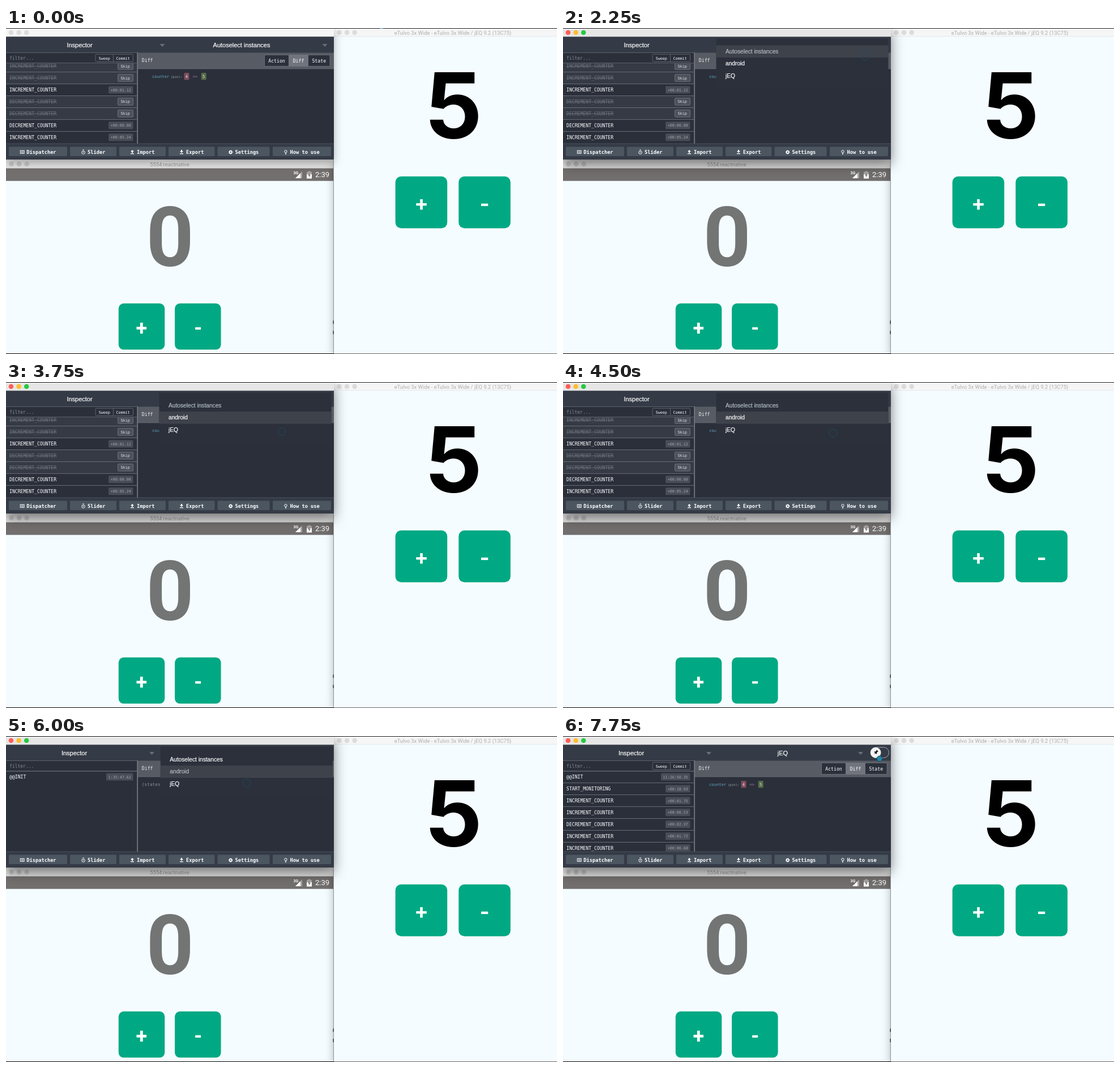
These frames come from a looping animation (973x575 px, 8 s). An HTML page:

```html
<!DOCTYPE html>
<html lang="en">
<head>
<meta charset="utf-8">
<title>Remote inspector</title>
<style>
html, body { margin: 0; width: 100%; height: 100%; overflow: hidden; background: #000; }
svg { display: block; width: 973px; height: 575px; }
text { white-space: pre; }
.firm { stroke: currentColor; stroke-width: .2px; }
#shade, #phone { filter: drop-shadow(0 5px 8px rgba(0,0,0,.3)); }
#shade.on { filter: drop-shadow(0 8px 11px rgba(0,0,0,.5)); }
</style>
</head>
<body>
<svg id="stage" viewBox="0 0 973 575" xmlns="http://www.w3.org/2000/svg"></svg>
<script>
const SANS = 'Liberation Sans, Arial, sans-serif';
const UI = 'Roboto, sans-serif';
const MONO = 'DejaVu Sans Mono, monospace';
const DEVICE = 'eTulvo 3x Wide', SYSTEM = 'jEQ';
const LOOP = 8000, STEP = 250;
const pen = document.createElement('canvas').getContext('2d');

const rect = (x, y, w, h, fill, extra = '') =>
  `<rect x="${x}" y="${y}" width="${w}" height="${h}" fill="${fill}" ${extra}/>`;
const text = (s, x, y, size, fill, font = MONO, extra = '') =>
  `<text x="${x}" y="${y}" font-size="${size}" fill="${fill}" font-family="${font}" ${extra}>${s}</text>`;
const mid = (s, x, y, size, fill, font = MONO, extra = '') =>
  text(s, x, y, size, fill, font, 'text-anchor="middle" ' + extra);
const path = (d, fill, extra = '') => `<path d="${d}" fill="${fill}" ${extra}/>`;
const disc = (x, y, r, fill, extra = '') => `<circle cx="${x}" cy="${y}" r="${r}" fill="${fill}" ${extra}/>`;
const group = (id, body, extra = '') => `<g id="${id}" ${extra}>${body}</g>`;
const lights = (x, y, fills) => fills.map((f, i) => disc(x + i * 13.6, y, 4.3, f)).join('');

// Centres the visible ink of a glyph on a point.
function glyph(s, x, y, size, weight, font, fill) {
  pen.font = `${weight} ${size}px ${font}`;
  const m = pen.measureText(s);
  const left = x - (m.actualBoundingBoxRight - m.actualBoundingBoxLeft) / 2;
  const base = y + (m.actualBoundingBoxAscent - m.actualBoundingBoxDescent) / 2;
  return text(s, left, base, size, fill, font, `font-weight="${weight}"`);
}

function key(s, x, y, side, size, weight, font, dy) {
  return rect(x, y, side, side, '#00a983', `rx="${side / 9}"`) +
    glyph(s, x + side / 2, y + side / 2 + dy, size, weight, font, '#fff');
}

function phone() {
  const font = 'Inter, sans-serif';
  return rect(579, 0, 394, 574.4, '#f5fcff', 'id="phone"') +
    rect(579, 0, 394, 15, '#f6f6f6') + rect(579, 14.5, 394, 0.7, '#dfe2e3') +
    lights(588.5, 8, ['#dcdcdc', '#dcdcdc', '#dcdcdc']) +
    mid(`${DEVICE} - ${DEVICE} / ${SYSTEM} 9.2 (13C75)`, 789, 11.5, 9.4, '#adadad', UI) +
    glyph('5', 791.5, 136.5, 160, 700, font, '#000') +
    key('+', 687.6, 261.7, 91.6, 37, 700, font, 3.5) + key('-', 799.3, 261.7, 91.6, 37, 700, font, 3.5);
}

function emulator() {
  return rect(0, 225, 579, 23, '#e2e2e2') + rect(0, 247.5, 579, 22, '#736f6f') +
    lights(9.5, 240, ['#c6c6c6', '#c6c6c6', '#c6c6c6']) +
    mid('5554:reactnative', 289, 243.7, 9.4, '#999', UI) +
    text('3G', 507.5, 258, 7, '#fff', UI, 'font-weight="700"') +
    path('M511 265L523 253V265Z', '#a9a6a6') + path('M511 265L520 256V265Z', '#fff') +
    path('M531 254h2.5v-1.5h4v1.5h2.5v4h-9z', '#a9a6a6') + path('M531 258h9v7.5h-9z', '#fff') +
    path('M536.5 255l-3.5 5h2.3l-.8 4 3.5-5h-2.2z', '#736f6f') +
    text('2:39', 546, 263.2, 13, '#fff', UI) +
    rect(0, 269.5, 579, 304.5, '#f5fcff') +
    glyph('0', 289.5, 367.7, 147, 700, UI, '#737575') +
    key('+', 198.8, 485.8, 81.5, 36, 700, UI, 2) + key('-', 298.1, 485.8, 81.5, 36, 700, UI, 2.5);
}

function seam() {
  return rect(578, 233, 1, 341, '#8d9294') + rect(577.5, 516, 1.5, 6, '#333') + rect(577.5, 534, 1.5, 6, '#333');
}

function chip(s, c) {
  const w = s.length * 4 + 7.5;
  return rect(224.5 - w, c - 6.5, w, 13, '#484d57', 'rx="1.5"') +
    mid(s, 224.5 - w / 2, c + 2.6, 6.7, '#a2a6ad');
}

// A row without a time stamp is skipped.
function row([name, time], c) {
  const skipped = !time;
  const tag = skipped
    ? rect(197.5, c - 6.3, 27, 12.6, '#4c515b', 'stroke="#757a83" stroke-width=".8" rx="1.5"') +
      mid('Skip', 210.7, c + 2.6, 6.8, '#e4e4e4')
    : chip(time, c);
  return (skipped ? rect(0, c - 10.2, 231, 20.6, '#353a44') : '') +
    text(name, 6, c + 3, 8.13, skipped ? '#6f747d' : '#fff', MONO,
      skipped ? 'text-decoration="line-through"' : '') + tag;
}

const INC = 'INCREMENT_COUNTER', DEC = 'DECREMENT_COUNTER';
const lists = {
  auto: [67, [[INC], [INC], [INC, '+00:01.12'], [DEC], [DEC], [DEC, '+00:00.00'], [INC, '+00:05.24']]],
  android: [72, [['@@INIT', '1:35:47.62']]],
  other: [72, [['@@INIT', '11:26:50.35'], ['START_MONITORING', '+00:18.93'], [INC, '+00:01.75'],
    [INC, '+00:00.53'], [DEC, '+00:02.37'], [INC, '+00:01.72'], [INC, '+00:00.68']]]
};
const labels = { auto: 'Autoselect instances', android: 'android', other: SYSTEM };
const modes = Object.keys(lists);

function list(mode) {
  const [top, rows] = lists[mode];
  const lines = rows.map((r, i) => {
    const c = top + i * 20.95;
    return row(r, c) + (i ? rect(0, c - 10.8, 231, 1, '#696d75') : '');
  });
  return group('list-' + mode, lines.join(''), 'clip-path="url(#pane)"');
}

function tabs() {
  const tab = (s, x, w, fill) =>
    rect(x, 47.5, w, 20, fill, 'stroke="#747881" stroke-width=".8"') + mid(s, x + w / 2, 60.5, 8.2, '#fff');
  return tab('Action', 456.5, 43, '#2b303b') + tab('Diff', 499.5, 34, '#70747d') + tab('State', 533.5, 38.5, '#2b303b');
}

function diff() {
  return text('counter', 258, 88, 7.2, '#63a4bb') + text('(pin):', 291, 88, 5.6, '#a0a4ab') +
    rect(314.5, 79, 9, 12.5, '#7d4d5c', 'rx="1.5"') + mid('4', 319, 88, 7.2, '#f3dfe4') +
    text('=&gt;', 329.5, 88, 7.2, '#a274ac') +
    rect(344.7, 79, 9, 12.5, '#566a49', 'rx="1.5"') + mid('5', 349.2, 88, 7.2, '#dcecc9');
}

function toolbar() {
  const line = 'stroke="#fff" stroke-width="1"';
  const tray = x => rect(x, 221, 6, 1.3, '#fff');
  const up = x => path(`M${x + 3} 215l3 3.2h-2v2h-2v-2h-2z`, '#fff') + tray(x);
  const down = x => path(`M${x + 3} 220.3l3-3.2h-2v-2h-2v2h-2z`, '#fff') + tray(x);
  const icons = [
    rect(25.3, 216.2, 6.8, 5, 'none', line) + rect(27, 217.6, 3.6, 0.8, '#fff') + rect(27, 219.4, 3.6, 0.8, '#fff'),
    disc(136.5, 219.5, 2.8, 'none', line) + path('M135.3 214.8h2.4M136.5 218v2', 'none', line),
    up(220), down(307),
    disc(396.7, 219, 2.1, 'none', 'stroke="#fff" stroke-width="1.8"') +
      disc(396.7, 219, 3.2, 'none', 'stroke="#fff" stroke-width="1" stroke-dasharray="1.2 1.31"'),
    disc(494, 217.8, 2.2, 'none', line) + path('M492.8 221.3h2.4M493.2 222.7h1.6', 'none', line)
  ];
  const items = [['Dispatcher', 5, 103, 36.3], ['Slider', 113, 82, 144], ['Import', 200, 82, 231],
    ['Export', 287, 81.5, 318], ['Settings', 373.5, 92, 404.5], ['How to use', 471, 103, 501.5]];
  return rect(0, 204, 579, 28, '#353b46') + rect(0, 203.5, 579, 1, '#4d525c') +
    items.map(([s, x, w, at], i) => rect(x, 209.5, w, 16.5, '#4b5661', 'rx="1.5"') +
      text(s, at, 221.7, 8.7, '#fff', MONO, 'font-weight="700"') + icons[i]).join('');
}

function header(id, label, left, leftTip, right, rightTip) {
  const tip = x => path(`M${x - 4.5} 28.2h9l-4.5 4.8z`, '#6d737d');
  const title = (s, x) => mid(s, x, 34, 11, '#fff', SANS, 'class="firm" color="#fff"');
  return group(id, title('Inspector', left) + tip(leftTip) + title(label, right) + tip(rightTip));
}

function toggle() {
  return rect(543, 20, 32.5, 18.5, '#353b46', 'rx="9.2" stroke="#a4a8ae" stroke-width="1"') +
    disc(552.3, 29.2, 9.2, '#f5f5f5') +
    path('M-1.9-4.2h3.8v1l-.7.5.4 2.2 1.4 1.2v.8H.5L0 4.8-.5 1.5H-3V.7l1.4-1.2.4-2.2-.7-.5z', '#111',
      'transform="translate(552.5 29) rotate(42)"');
}

function menu() {
  return group('menu', rect(0, 18.5, 304, 88, '#2b303b') +
    rect(0, 30.5, 304, 21.7, '#3e424b', 'id="hover"') +
    modes.map((m, i) =>
      text(labels[m], 16.5, 44.7 + i * 21.6, 10.2, '#fff', SANS, `id="item-${m}" class="firm"`)).join(''));
}

function inspector() {
  return rect(0, 0, 579, 232, '#2a2f3a', 'id="shade"') +
    rect(0, 0, 579, 15.5, '#f6f6f6') +
    group('idle', lights(9, 8, ['#dcdcdc', '#dcdcdc', '#dcdcdc'])) +
    group('focus', rect(0, 0, 579, 15.5, '#e6e6e6') + lights(9, 8, ['#ff5f57', '#ffbd2e', '#28c940'])) +
    rect(0, 15.5, 579, 28, '#353b46') +
    modes.map(m => m === 'auto' ? header('head-auto', labels.auto, 130, 276, 416, 563)
      : header('head-' + m, labels[m], 120.5, 257.5, 388, 525.5)).join('') +
    group('toggle', toggle()) +
    rect(0, 43, 231, 1, '#5c6069') + text('filter...', 6, 56, 8, '#858b94') +
    group('sweep', rect(158, 46.3, 66.5, 13, '#2a2f3a', 'rx="1.5" stroke="#5e636d" stroke-width="1"') +
      rect(189, 46.3, 1, 13, '#5e636d') + mid('Sweep', 173.7, 55.5, 6.7, '#fff') + mid('Commit', 206.5, 55.5, 6.7, '#fff')) +
    rect(0, 61.5, 231, 1, '#7d8189') + modes.map(list).join('') +
    rect(231.3, 43, 1.7, 161, '#777a81') +
    rect(233, 43.5, 346, 28.5, '#575b64') + rect(233, 71.5, 346, 0.8, '#696d75') +
    text('Diff', 239.8, 60.2, 8.2, '#f0f0f0') + tabs() +
    group('diff', diff()) + group('equal', text('(states are equal)', 239.8, 87.5, 7.8, '#8b9099')) +
    toolbar() + menu();
}

const stage = document.getElementById('stage');
stage.innerHTML = '<defs><clipPath id="pane"><rect x="0" y="62.3" width="231" height="141.2"/></clipPath></defs>' +
  rect(0, 0, 973, 575, '#000') + emulator() + phone() + seam() + inspector() +
  rect(0, 0, 973, 1, '#1c1c1c') + '<circle id="ring" stroke-width="1"/>';

const el = id => document.getElementById(id);
const show = (id, on) => el(id).style.display = on ? '' : 'none';

// Pointer path: time, x, y
const track = [[0, 663, -6], [500, 551, 33], [1000, 551, 33], [1250, 546, 48], [2250, 533, 50], [2750, 517, 66],
  [3500, 490, 87], [4500, 477, 90], [4750, 468, 76], [5250, 450, 52], [5500, 447, 55], [6000, 425, 83],
  [6500, 416, 104], [6750, 413, 98], [7500, 559, 46], [7750, 559, 40]];
// Menu states: time, open amount, hovered item
const menuSteps = [[0, 0, 0], [1750, 1, 0], [3250, 1, 1], [4750, 0, 1], [5500, 1, 1], [6250, 1, 2], [6750, 0.12, 2], [7000, 0, 2]];
const clicks = [1500, 5250, 7750];

function pointer(t) {
  const i = track.findIndex(k => k[0] >= t);
  if (i < 1) return track[i < 0 ? track.length - 1 : 0].slice(1);
  const [a, b] = [track[i - 1], track[i]], p = (t - a[0]) / (b[0] - a[0]);
  return [1, 2].map(n => a[n] + (b[n] - a[n]) * p);
}

function draw(t) {
  const mode = t < 4750 ? 'auto' : t < 6750 ? 'android' : 'other';
  const focused = t >= 1250;
  show('idle', !focused);
  show('focus', focused);
  el('shade').setAttribute('class', focused ? 'on' : '');
  for (const m of modes) {
    const tone = m === mode ? '#b4bcc4' : '#fff';
    show('list-' + m, m === mode);
    show('head-' + m, m === mode);
    el('item-' + m).setAttribute('fill', tone);
    el('item-' + m).setAttribute('color', tone);
  }
  show('toggle', mode !== 'auto');
  show('sweep', mode !== 'android');
  show('diff', mode !== 'android');
  show('equal', mode === 'android');

  const [, open, hover] = menuSteps.filter(s => s[0] <= t).pop();
  show('menu', open > 0);
  el('menu').setAttribute('transform', `translate(${mode === 'auto' ? 270.5 : 272.8} ${20 * (1 - open)}) scale(1 ${open || 1})`);
  el('menu').setAttribute('opacity', open < 1 ? 0.25 : 1);
  el('hover').setAttribute('y', 30.5 + hover * 21.6);

  const [x, y] = pointer(t), down = clicks.includes(t), ring = el('ring');
  ring.setAttribute('cx', x);
  ring.setAttribute('cy', y);
  ring.setAttribute('r', down ? 4.8 : 6.8);
  ring.setAttribute('fill', down ? '#1d84a8' : 'none');
  ring.setAttribute('stroke', focused ? '#1f4b62' : '#45b3cf');
}

let last = -1;
const start = performance.now();
function tick() {
  const t = Math.floor((performance.now() - start) % LOOP / STEP) * STEP;
  if (t !== last) draw(last = t);
  requestAnimationFrame(tick);
}
tick();
</script>
</body>
</html>
```
